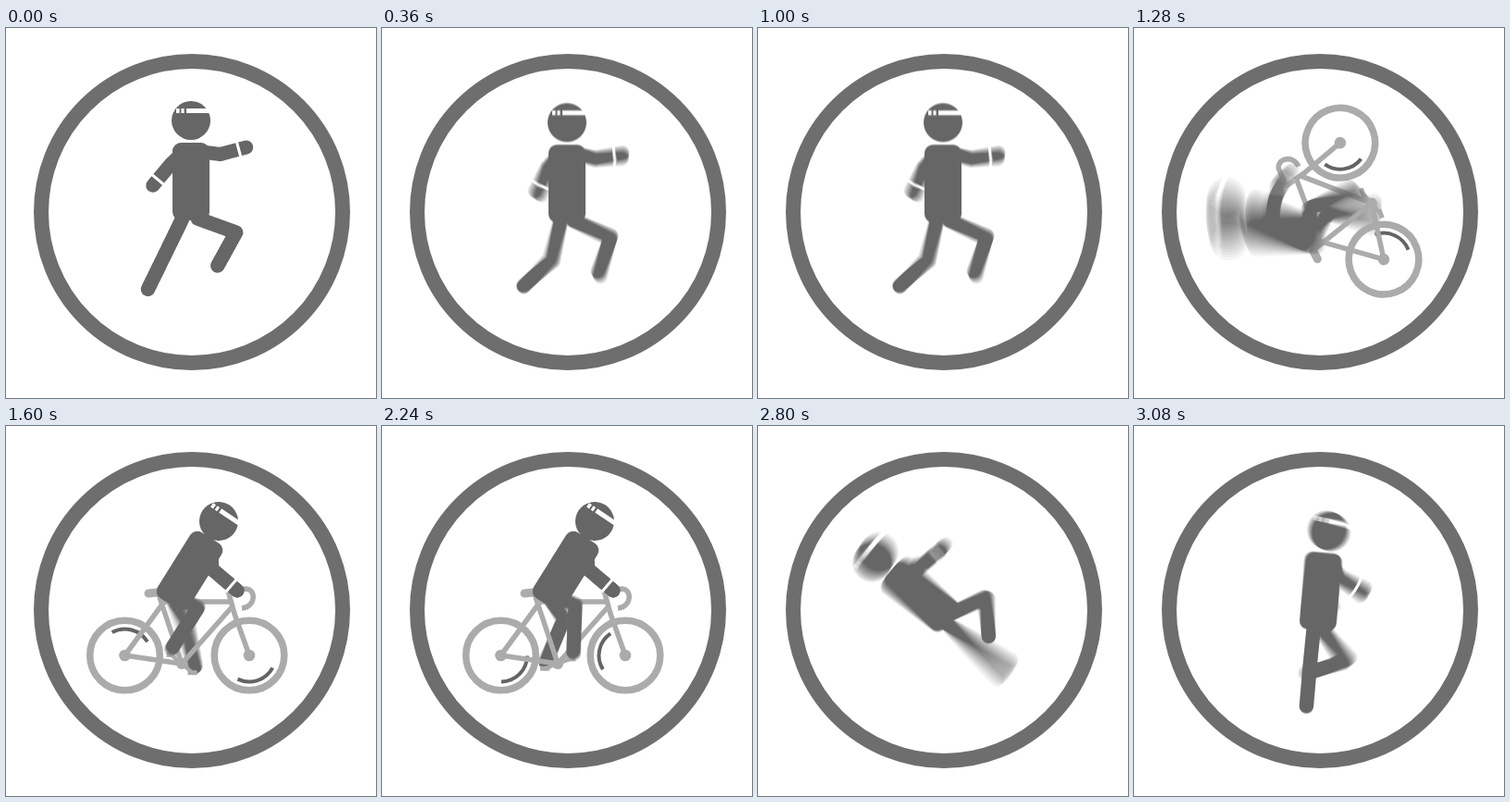
Write an HTML page with a canvas that moves like this. It is 400 by 400 pixels and loops after 3.12 s.

```html
<!DOCTYPE html>
<html lang="en">
<head>
<meta charset="utf-8">
<title>Run and ride</title>
<style>
  html, body { margin: 0; width: 100%; height: 100%; overflow: hidden; background: #fff; }
  canvas { display: block; width: 400px; height: 400px; }
</style>
</head>
<body>
<canvas id="stage" width="400" height="400"></canvas>
<script>
const LOOP = 3120, FRAME = 40, SHUTTER = 20, SAMPLES = 17;
const DARK = '#646464', BIKE = '#ababab', RING = '#6e6e6e';
const rad = Math.PI / 180;

const layer = () => {
  const c = document.createElement('canvas');
  c.width = c.height = 400;
  return c.getContext('2d');
};
const main = document.getElementById('stage').getContext('2d');
const scratch = layer(), sum = layer();

// Smooth curve through [x, y] keys, flat at both ends.
function curve(keys) {
  const n = keys.length - 1;
  const slope = i => i <= 0 || i >= n ? 0 :
    (keys[i + 1][1] - keys[i - 1][1]) / (keys[i + 1][0] - keys[i - 1][0]);
  return x => {
    if (x <= keys[0][0]) return keys[0][1];
    if (x >= keys[n][0]) return keys[n][1];
    let i = 0;
    while (x > keys[i + 1][0]) i++;
    const [x0, y0] = keys[i], [x1, y1] = keys[i + 1];
    const w = x1 - x0, u = (x - x0) / w, v = 1 - u;
    return y0 * v * v * (1 + 2 * u) + y1 * u * u * (1 + 2 * v)
      + w * u * v * (v * slope(i) - u * slope(i + 1));
  };
}

const spinIn = curve([[1000, 0], [1040, 2], [1080, 9], [1120, 27], [1160, 68], [1200, 125],
  [1240, 190], [1280, 249.5], [1320, 298], [1360, 325], [1400, 340], [1440, 349],
  [1480, 354], [1520, 358], [1600, 360]]);
const spinOut = curve([[2240, 0], [2320, 1], [2400, 4], [2440, 8], [2480, 16], [2520, 33],
  [2560, 62], [2600, 113], [2640, 167], [2680, 218], [2720, 259], [2760, 285], [2800, 305],
  [2840, 333], [2880, 351], [2920, 364], [2960, 372], [3000, 374], [3040, 371],
  [3080, 365], [3120, 360]]);
const spin = t => t < 1900 ? spinIn(t) : spinOut(t);

// Limb angles from straight down, forward positive; cycle length 16.
const thighAngle = curve([[-1, -13], [0, -26], [1, -13], [2, -5], [4, 25], [6, 60], [7, 72],
  [8, 70], [9, 66], [10, 50], [12, 10], [14, -8], [15, -13], [16, -26], [17, -13]]);
const shinAngle = curve([[-1, -14], [0, -26], [1, -47], [2, -68], [4, -75], [6, -55], [7, -37],
  [8, -29], [9, -18], [10, 0], [12, 4], [14, -6], [15, -14], [16, -26], [17, -47]]);
const upperArm = curve([[0, -45], [1, -40], [4, 18], [7, 75], [8, 83]]);
const foreArm = curve([[0, -40], [1, -22], [4, 45], [7, 97], [8, 105]]);

const swing = ([x, y], length, deg) =>
  [x + length * Math.sin(deg * rad), y + length * Math.cos(deg * rad)];
const polar = ([x, y], r, deg) => [x + r * Math.cos(deg * rad), y + r * Math.sin(deg * rad)];

function runPose(t) {
  const phase = ((t / FRAME) % 16 + 16) % 16;
  const bob = 7.5 * (1 - Math.cos(phase * Math.PI / 4));
  const leg = p => {
    const a = thighAngle(p);
    const hip = [196 + 12 * Math.sin(a * rad), 206 + bob];
    const knee = swing(hip, 44, a);
    return [hip, knee, swing(knee, 41, shinAngle(p))];
  };
  const arm = p => {
    const q = Math.min(p, 16 - p), a = upperArm(q);
    const shoulder = [200 + 12 * Math.sin(a * rad), 134 + bob];
    const elbow = swing(shoulder, 20, a);
    return [shoulder, elbow, swing(elbow, 29, foreArm(q))];
  };
  const other = (phase + 8) % 16;
  const tilt = t > 2900 ? 1.5 * (spin(t) - 360) : 0;
  const head = swing([200, 124 + bob], -24, -tilt);
  return { torso: [200, 166 + bob], lean: 0, head, tilt,
    far: leg(phase), near: leg(other), armA: arm(phase), armB: arm(other) };
}

const crank = t => 220 + 0.75 * (t - 1600);
const BRACKET = [190, 257];

function ridePose(t) {
  const lift = Math.cos(t * 2 * Math.PI / 320) - 1;
  const leg = deg => {
    const hip = [176, 179], thigh = 36, shin = 51;
    const [px, py] = polar(BRACKET, 16, deg);
    const foot = [px + 2, py - 7];
    const dx = foot[0] - hip[0], dy = foot[1] - hip[1];
    const d = Math.min(Math.hypot(dx, dy), thigh + shin);
    const bend = Math.acos((thigh ** 2 + d * d - shin ** 2) / (2 * thigh * d)) / rad;
    return [hip, polar(hip, thigh, Math.atan2(dy, dx) / rad - bend), foot];
  };
  const arm = [[221, 134], [223, 155], [250, 178]];
  return { torso: [198.5, 156.5 + lift], lean: 32, head: [230, 103 + lift], tilt: 34,
    far: leg(crank(t) + 180), near: leg(crank(t)), armA: arm, armB: arm };
}

function mix(a, b, k) {
  if (Array.isArray(a)) return a.map((v, i) => mix(v, b[i], k));
  return a + (b - a) * k;
}
const toRide = curve([[1080, 0], [1240, 1]]), toRun = curve([[2680, 1], [2840, 0]]);

function pose(t) {
  const k = t < 1900 ? toRide(t) : toRun(t);
  const run = runPose(t), ride = ridePose(t), out = {};
  for (const key in run) out[key] = mix(run[key], ride[key], k);
  return out;
}

function line(g, points, width, color, cap = 'round') {
  g.beginPath();
  points.forEach(p => g.lineTo(...p));
  g.lineWidth = width;
  g.strokeStyle = color;
  g.lineCap = cap;
  g.lineJoin = 'round';
  g.stroke();
}
function arc(g, [x, y], r, width, color, from = 0, to = 360) {
  g.beginPath();
  g.arc(x, y, r, from * rad, to * rad);
  g.lineWidth = width;
  g.strokeStyle = color;
  g.lineCap = 'butt';
  g.stroke();
}
function dot(g, [x, y], r, color) {
  g.beginPath();
  g.arc(x, y, r, 0, 7);
  g.fillStyle = color;
  g.fill();
}
function placed(g, [x, y], deg, draw) {
  g.save();
  g.translate(x, y);
  g.rotate(deg * rad);
  draw();
  g.restore();
}
function spun(g, t, draw) {
  placed(g, [200, 200], spin(t), () => { g.translate(-200, -200); draw(); });
}

function drawArm(g, arm) {
  const [, elbow, hand] = arm;
  line(g, arm, 15, DARK);
  const d = Math.hypot(hand[0] - elbow[0], hand[1] - elbow[1]) || 1;
  line(g, [mix(hand, elbow, 7 / d), mix(hand, elbow, 10 / d)], 18, '#fff', 'butt');
}

function drawHead(g, p) {
  placed(g, p.head, p.tilt, () => {
    dot(g, [0, 0], 21, DARK);
    g.fillStyle = '#fff';
    g.fillRect(-16, -13, 37, 5);
    g.fillStyle = DARK;
    g.fillRect(-12.5, -15, 2, 9);
    g.fillRect(-7.5, -15, 2.5, 9);
  });
}

function drawBody(g, p) {
  line(g, p.near, 15.5, DARK);
  drawArm(g, p.armA);
  drawArm(g, p.armB);
  placed(g, p.torso, p.lean, () => {
    g.beginPath();
    g.roundRect(-20, -42, 40, 84, 9);
    g.fillStyle = DARK;
    g.fill();
  });
  drawHead(g, p);
}

function drawBike(g, t) {
  const rear = [128.5, 248], front = [263, 248], seat = [169, 192], neck = [244, 196];
  const turn = 0.75 * (t - 2240);
  [[rear, 45], [front, 192]].forEach(([hub, offset]) => {
    arc(g, hub, 37.8, 7.5, BIKE);
    arc(g, hub, 28.5, 4, DARK, turn + offset - 44, turn + offset + 44);
    dot(g, hub, 6.3, BIKE);
  });
  line(g, [rear, BRACKET, [166, 185]], 5.5, BIKE);
  line(g, [rear, [171, 190], [243, 190]], 5.5, BIKE);
  line(g, [BRACKET, neck], 5.5, BIKE);
  line(g, [front, [247, 203], [240, 178]], 5.5, BIKE);
  line(g, [[154, 181], [163, 180]], 9, BIKE);
  g.beginPath();
  g.moveTo(241, 177);
  g.lineTo(259, 176);
  g.bezierCurveTo(271, 176, 270, 196, 255, 197);
  g.lineWidth = 5.5;
  g.strokeStyle = BIKE;
  g.lineCap = 'butt';
  g.stroke();
  const a = polar(BRACKET, 15, crank(t)), b = polar(BRACKET, 15, crank(t) + 180);
  line(g, [a, b], 4, BIKE);
  [a, b].forEach(([x, y]) => line(g, [[x - 5, y], [x + 5, y]], 5, BIKE, 'butt'));
  dot(g, BRACKET, 6, BIKE);
}

// Averages several moments around t into one blurred layer.
function blurred(t, shutter, draw) {
  sum.clearRect(0, 0, 400, 400);
  sum.globalCompositeOperation = 'lighter';
  sum.globalAlpha = 1 / SAMPLES;
  for (let i = 0; i < SAMPLES; i++) {
    const at = t + shutter * (i / (SAMPLES - 1) - 0.5);
    scratch.clearRect(0, 0, 400, 400);
    spun(scratch, at, () => draw(scratch, pose(at)));
    sum.drawImage(scratch.canvas, 0, 0);
  }
  main.drawImage(sum.canvas, 0, 0);
}

function render(t) {
  const shutter = t ? SHUTTER : 0;
  main.fillStyle = '#fff';
  main.fillRect(0, 0, 400, 400);
  arc(main, [201, 199], 163, 16, RING);
  blurred(t, shutter, (g, p) => line(g, p.far, 15.5, DARK));
  if (t >= 1240 && t < 2700) spun(main, t, () => drawBike(main, t));
  blurred(t, shutter, drawBody);
}

const start = performance.now();
let shown = -1;
function tick() {
  const elapsed = Math.max(0, performance.now() - start) % LOOP;
  const t = Math.floor(elapsed / FRAME) * FRAME;
  if (t !== shown) render(shown = t);
  requestAnimationFrame(tick);
}
tick();
</script>
</body>
</html>
```
